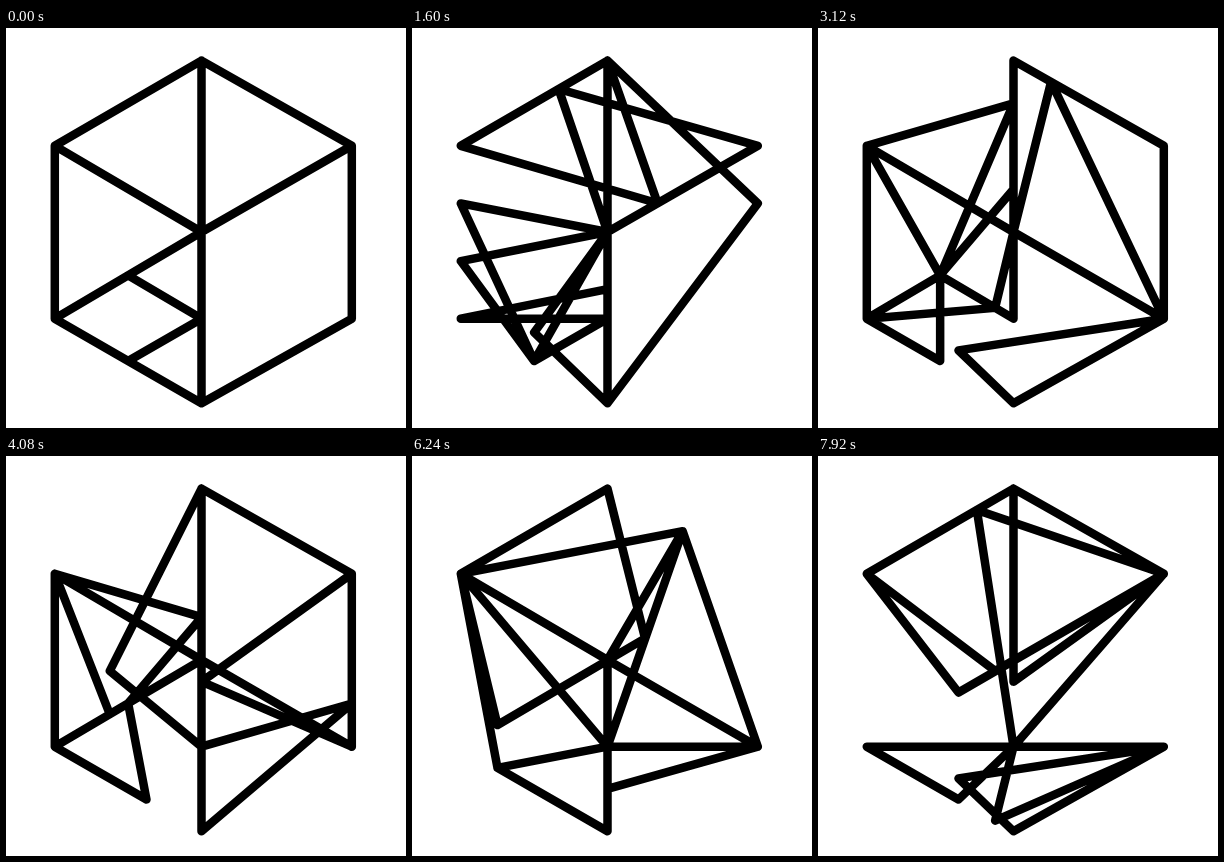
Animation, 400 px wide and 400 px high, one loop 8000 ms. Source, as an HTML page:

```html
<!DOCTYPE html>
<html lang="en">
<head>
<meta charset="utf-8">
<title>Sliding tangram cube</title>
<style>
  html, body { margin: 0; width: 100%; height: 100%; overflow: hidden; background: #fff; }
  svg { display: block; width: 100%; height: 100%; }
  path { fill: none; stroke: #000; stroke-width: 8.5; stroke-linejoin: round; stroke-linecap: round; }
</style>
</head>
<body>
<svg viewBox="0 0 400 400"><path id="lines"/></svg>
<script>
const LOOP = 8000, TICK = 80, MOVE = 960;

// Corners of the cube, its centre C, the half-way node M below it, and midpoints P, Q, E
const nodes = {
  T: [195.5, 32.6], U: [345.8, 117.8], R: [345.8, 290.7], B: [195.5, 375.2],
  L: [48.8, 290.7], W: [48.8, 117.8], C: [195.5, 204], M: [195.5, 290.7]
};
const mid = (a, b) => nodes[a].map((v, i) => (v + nodes[b][i]) / 2);
nodes.P = mid('C', 'L');
nodes.Q = mid('L', 'B');
nodes.E = mid('C', 'U');

// Each piece: the nodes its corners occupy, pose after pose
const pieces = [
  'TWC UWC UTC RTC RUC RUM RCM RCB RMB RMQ',
  'TUC TUW TCW TPW CPW CLW MLW MQW MQL MBL',
  'WLC WQC LQC LQP LQP LBP LBM QBM QBR MBR',
  'CPM CPB CQB RQB RMB UMB UMR TMR TMU WMU',
  'MQB MLB MLC MPC MPT MWT CWT CWU CTU MTU',
  'URBC TRBC TUBC TURC TURC TURC WURC WTRC WTUC WTUP',
  'PMQL CMQL CMQW CMLW CPLW TPLW TCLW TEPW TUPW TUCW'
].map(s => s.split(' '));

const lines = document.getElementById('lines');

function outline(poses, step, p) {
  const next = poses[step + 1];
  const corners = [...poses[step]].map((from, i) =>
    nodes[from].map((v, axis) => v + (nodes[next[i]][axis] - v) * p));
  return 'M' + corners.join('L') + 'Z';
}

function draw(now) {
  const t = Math.floor(now % LOOP / TICK) * TICK;
  const step = Math.floor(t / MOVE);
  const p = t / MOVE - step;
  lines.setAttribute('d', pieces.map(poses => outline(poses, step, p)).join(''));
}

const start = performance.now();
function frame() {
  draw(performance.now() - start);
  requestAnimationFrame(frame);
}
frame();
</script>
</body>
</html>
```
